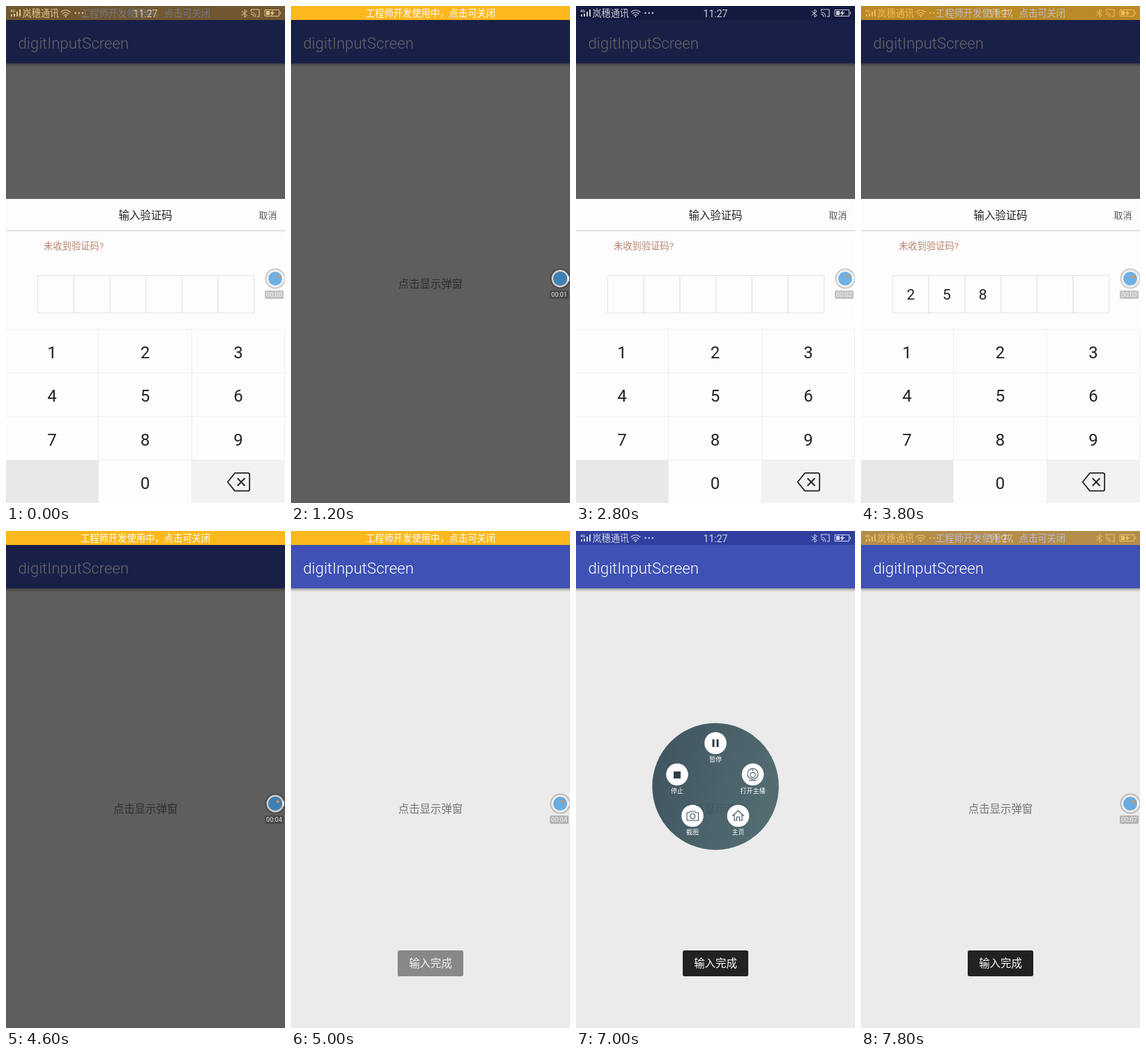
An HTML page that plays this animation: 400x711 px, repeating every 8000 ms.

```html
<!DOCTYPE html>
<html lang="zh-CN">
<head>
<meta charset="utf-8">
<style>
html, body { margin: 0; height: 100%; overflow: hidden; background: #ebebeb; }
svg { display: block; width: 100vw; height: 100vh; }
text { font-family: Roboto, "Noto Sans CJK SC", "Noto Sans CJK", sans-serif; }
.mid { text-anchor: middle; }
.line { fill: none; stroke-linecap: round; stroke-linejoin: round; }
</style>
</head>
<body>
<svg viewBox="0 0 400 711">
  <defs>
    <linearGradient id="shade" x2="0" y2="1">
      <stop stop-opacity=".32"/><stop offset="1" stop-opacity="0"/>
    </linearGradient>
    <linearGradient id="slate" y2=".35">
      <stop stop-color="#2b414e"/><stop offset="1" stop-color="#415e64"/>
    </linearGradient>
  </defs>

  <rect width="400" height="711" fill="#ebebeb"/>
  <rect y="82" width="400" height="5" fill="url(#shade)"/>
  <rect width="400" height="82" fill="#3f51b5"/>
  <rect width="400" height="20" fill="#303f9f"/>
  <text x="17.5" y="61" font-size="22.2" font-weight="300" fill="#fff">digitInputScreen</text>
  <text class="mid" x="200" y="403.2" font-size="15.4" fill="#747474">点击显示弹窗</text>
  <rect id="dim" width="400" height="711" opacity=".6"/>

  <g id="dialog">
    <rect y="276" width="400" height="435" fill="#fdfdfd"/>
    <path d="M0 321.5H400" stroke="#c9c9c9"/>
    <text class="mid" x="200" y="304.8" font-size="15.4" fill="#222">输入验证码</text>
    <text x="362.5" y="303.6" font-size="13" fill="#555">取消</text>
    <text x="54" y="347.5" font-size="13.3" fill="#b9826f">未收到验证码?</text>
    <g id="cells" fill="none" stroke="#e4e4e4"></g>
    <g id="code" class="mid" font-size="21" fill="#222"></g>
    <rect y="650" width="132" height="61" fill="#e8e8e8"/>
    <rect x="267" y="650" width="133" height="61" fill="#f2f2f2"/>
    <path d="M0 462.5H400M0 525H400M0 587.3H400M0 649.6H400M132.5 462V711M266.5 462V711M399.5 462V650" fill="none" stroke="#efefef"/>
    <g id="keys" class="mid" font-size="24" fill="#222"></g>
    <path class="line" d="M317.8 681L328 668.2H347Q349.2 668.2 349.2 670.4V691.4Q349.2 693.6 347 693.6H328ZM332.3 676L342 686M342 676L332.3 686" stroke="#222" stroke-width="1.8"/>
  </g>

  <g fill="#fff" opacity=".78">
    <text x="6" y="9" font-size="5.5" font-weight="700">4G</text>
    <path d="M7 12h2v3h-2zM11 11h2v4h-2zM15 8h2v7h-2zM19 5h2v10h-2z"/>
    <text x="23.5" y="15" font-size="13.1">岚穗通讯</text>
    <path class="line" d="M79 8.5Q85.5 3 92 8.5M81.2 11Q85.5 7.5 89.8 11M83.3 13.3Q85.5 11.7 87.7 13.3" stroke="#fff" stroke-width="1.2"/>
    <circle cx="85.5" cy="15" r="1"/>
    <circle cx="99.5" cy="10" r="1.2"/><circle cx="104.7" cy="10" r="1.2"/><circle cx="110" cy="10" r="1.2"/>
    <text class="mid" x="200" y="15.5" font-size="14">11:27</text>
    <path class="line" d="M338 7.5L345.5 13.5L342 16V5L345.5 7.5L338 13.5" stroke="#fff"/>
    <path class="line" d="M351.5 7V5H363V15H360M351.5 9Q357.5 9 357.5 15M351.5 11.8Q354.8 11.8 354.8 15" stroke="#fff" stroke-width="1.1"/>
    <path class="line" d="M371.5 5.5H391.5V14.5H371.5ZM393.5 8.5V11.5" stroke="#fff"/>
    <path d="M373 7H378V13H373ZM383.5 5.5L378 10.8H381.2L379.8 14.8L385.5 9.3H382.2Z"/>
  </g>

  <g id="banner">
    <rect width="400" height="20" fill="#fdb81e"/>
    <text class="mid" x="200" y="15.3" font-size="13.3" fill="#fff">工程师开发使用中，点击可关闭</text>
  </g>

  <g id="toast">
    <rect x="153" y="600" width="94" height="37" rx="2.5" fill="#222"/>
    <text class="mid" x="200" y="624.3" font-size="15.4" fill="#fff">输入完成</text>
  </g>

  <g id="widget">
    <circle cx="386" cy="390" r="14.7" fill-opacity=".18"/>
    <circle cx="386" cy="390" r="11.2" fill="none" stroke="#fff" stroke-width="2.4" stroke-opacity=".75"/>
    <path d="M396 386.5h3v7h-3z" fill="#fff" fill-opacity=".7"/>
    <circle cx="386" cy="390" r="9.8" fill="#37a0f0" fill-opacity=".64"/>
    <circle id="dot" cx="389.6" cy="387.2" r="2.1" fill="#e98f3c" opacity=".9"/>
    <rect x="371" y="407" width="27" height="12" rx="2" fill-opacity=".23"/>
    <text id="timer" class="mid" x="384.5" y="416.4" font-size="9.2" fill="#fff" fill-opacity=".85"></text>
  </g>

  <g id="menu">
    <circle cx="200" cy="365.5" r="90.7" fill="url(#slate)" opacity=".9"/>
    <g id="items" class="mid" font-size="9"></g>
    <path d="M195.5 298h3v11h-3zM201.5 298h3v11h-3zM140 344h10v10h-10z" fill="#2c3e4a"/>
    <g class="line" stroke="#3f535e" stroke-width="1.1">
      <circle cx="253.5" cy="347.5" r="7.6"/><circle cx="253.5" cy="349" r="3.6"/>
      <path d="M253.5 341.5v1.5M248.5 357H258.5"/>
      <path d="M159 403H162.5L164 401H170L171.5 403H175.5V414H159Z"/><circle cx="167.2" cy="408" r="3.5"/>
      <path d="M224.5 407.5L232.5 400L240.5 407.5M227 406V414H230.5V409H234.5V414H238V406"/>
    </g>
  </g>
</svg>
<script>
const CODE = "258036", FIRST_KEY = 3400, STEP = 200, LOOP = 8000;
const $ = id => document.getElementById(id);
const text = (x, y, s, fill = "") => `<text x="${x}" y="${y}" ${fill}>${s}</text>`;

$("cells").innerHTML = [...CODE].map((_, i) =>
  `<rect x="${45.5 + i * 51.7}" y="385.5" width="51.7" height="53.5"/>`).join("");
$("keys").innerHTML = [..."123456789 0"].map((d, i) =>
  text([66, 199.5, 333][i % 3], 504 + 62.3 * Math.floor(i / 3), d)).join("");
$("code").innerHTML = [...CODE].map((d, i) => text(71.3 + i * 51.7, 419.5, d)).join("");
$("items").innerHTML = [
  [200, 303.5, "暂停"], [145, 348.3, "停止"], [253.5, 348.3, "打开主播"],
  [167, 407.5, "截图"], [232.5, 407.5, "主页"]
].map(([x, y, s]) => `<circle cx="${x}" cy="${y}" r="15.8" fill="#fff"/>` +
  text(x, y + 26.7, s, 'fill="#fff"')).join("");

// Linear interpolation through [time, value] pairs
function track(keys, t) {
  const i = keys.findIndex(k => k[0] > t);
  if (i === 0) return keys[0][1];
  if (i < 0) return keys[keys.length - 1][1];
  const [t0, a] = keys[i - 1], [t1, b] = keys[i];
  return a + (b - a) * (t - t0) / (t1 - t0);
}

const banner = [[0, .4], [200, .97], [400, .97], [600, 1], [1600, 1], [2400, 0],
  [3200, 0], [4000, .95], [4200, 1], [6000, 1], [6800, 0], [7200, 0], [7400, .15], [7800, .65]];
const dim = [[1400, 1], [1600, 0], [2000, 0], [2200, .35], [2400, .9], [2600, 1], [4600, 1], [4800, 0]];
const slide = [[1000, 0], [1200, 1], [2000, 1], [2200, .7], [2400, .12], [2600, 0], [4400, 0], [4600, 1]];
const toast = [[4800, 0], [5000, .49], [5200, .9], [5400, 1]];
const menu = [[6200, 0], [6400, .45], [6600, .85], [6800, 1], [7200, 1], [7400, .5], [7600, 0]];
const ticks = [600, 1600, 3000, 4000, 5200, 6200, 7200];

function draw(t) {
  const open = track(menu, t);
  $("banner").setAttribute("opacity", track(banner, t));
  $("dim").setAttribute("opacity", .6 * track(dim, t));
  $("dialog").setAttribute("transform", `translate(0 ${435 * track(slide, t)})`);
  $("toast").setAttribute("opacity", track(toast, t));
  $("menu").setAttribute("opacity", open);
  $("menu").setAttribute("transform", `translate(200 365.5) scale(${open}) translate(-200 -365.5)`);
  $("widget").setAttribute("opacity", open > 0 ? 0 : 1);
  $("dot").setAttribute("opacity", t >= 200 && t < 1600 ? 0 : .9);
  $("timer").textContent = "00:0" + ticks.filter(k => k <= t).length;
  [...$("code").children].forEach((d, i) => {
    const shown = t >= FIRST_KEY + i * STEP && t < 4600;
    d.setAttribute("opacity", shown ? 1 : 0);
  });
}

const start = performance.now();
function frame() {
  const t = (performance.now() - start) % LOOP;
  draw(Math.floor(t / STEP) * STEP);
  requestAnimationFrame(frame);
}
frame();
</script>
</body>
</html>
```
